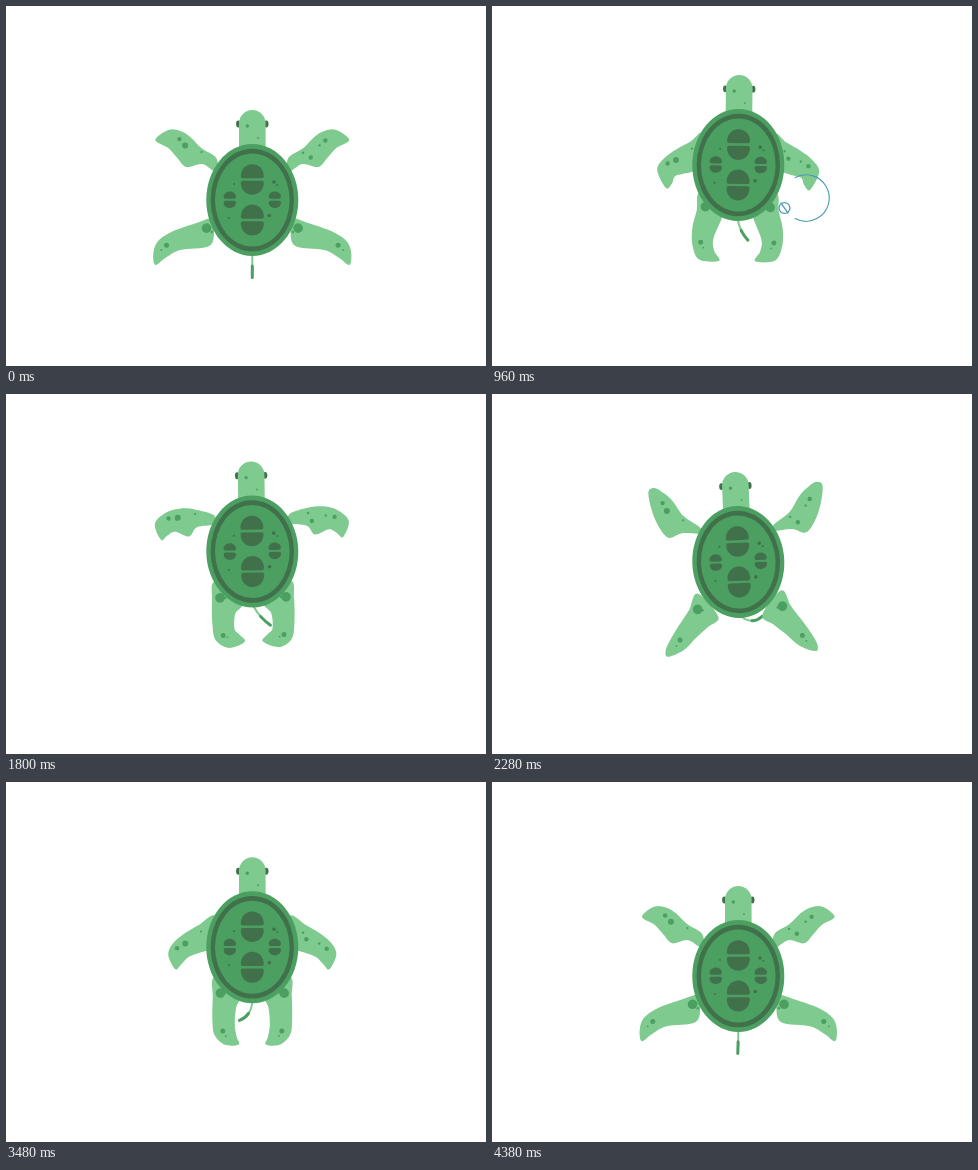
An HTML page with a canvas for the animation above (4410 ms loop, 480 by 360 pixels).

```html
<!DOCTYPE html>
<html lang="en">
<head>
<meta charset="utf-8">
<title>Swimming turtle</title>
<style>
html, body { margin: 0; width: 100%; height: 100%; overflow: hidden; background: #fff; }
canvas { display: block; width: 480px; height: 360px; }
</style>
</head>
<body>
<canvas id="stage" width="480" height="360"></canvas>
<script>
const ctx = document.getElementById('stage').getContext('2d');
const LOOP = 4410, STEP = 30, CENTER_X = 246.3;
const LIGHT = '#7fcb8f', MID = '#4b9f60', DARK = '#41714b', BUBBLE = '#4a9bb5';

// Limb outlines for the right side, relative to the shell centre (x, y pairs).
const front = {
  raised: [36,-42, 51,-52, 62,-63, 72,-69, 84,-70, 97,-60, 84,-52, 75,-42, 66,-33, 50,-36, 36,-28],
  sweep: [37,-36, 56,-37, 74,-37, 90,-33, 101,-25, 104,-14, 92,-12, 80,-10, 66,-6, 52,-13, 37,-14],
  folded: [36,-31, 48,-23, 62,-15, 74,-6, 81,6, 72,24, 66,19, 63,12, 52,9, 42,6, 36,2],
  curled: [38,-37, 57,-43, 72,-44, 86,-40, 97,-29, 91,-13, 85,-17, 77,-21, 63,-16, 55,-25, 38,-28],
  high: [37,-36, 53,-48, 63,-63, 71,-71, 80,-77, 87,-74, 85,-57, 79,-40, 69,-27, 55,-31, 37,-30],
  down: [37,-31, 54,-22, 69,-13, 80,-3, 84,8, 77,22, 71,17, 64,10, 54,6, 43,3, 36,4]
};
const rear = {
  spread: [38,18, 56,23, 81,32, 95,42, 99,54, 97,65, 87,58, 72,50, 43,46, 38,30],
  hooked: [38,28, 41,46, 45,62, 45,80, 38,95, 18,96, 23,86, 24,74, 16,54, 12,40],
  tucked: [38,30, 41,48, 41,72, 38,88, 25,96, 9,90, 14,83, 19,77, 18,62, 11,50],
  diagonal: [42,30, 51,46, 63,63, 72,77, 76,86, 74,92, 58,86, 45,74, 33,64, 22,54],
  closed: [38,30, 39,50, 38,76, 35,89, 24,98, 10,96, 13,88, 15,76, 14,58, 10,42],
  straight: [37,30, 43,48, 51,66, 53,82, 47,94, 36,101, 33,93, 33,80, 27,66, 18,50]
};

// Tracks: [time, values]
const frontTrack = [
  [0, front.raised], [240, front.sweep], [800, front.down], [960, front.folded],
  [1600, front.folded], [1800, front.curled], [2280, front.high], [2520, front.sweep],
  [3000, front.down], [3870, front.down], [4100, front.curled]
];
const rearTrack = [
  [0, rear.spread], [560, rear.straight], [960, rear.hooked], [1800, rear.tucked],
  [2280, rear.diagonal], [2640, rear.straight], [3000, rear.closed], [3300, rear.closed],
  [3870, rear.straight]
];
const heightTrack = [
  [0, [194]], [540, [164]], [960, [159]], [1500, [156.3]], [1800, [157.5]], [2280, [168]],
  [2680, [158]], [3000, [159]], [3300, [161]], [3780, [179]], [3870, [187]], [4050, [193]]
];
const tiltTrack = [[0, [0]], [960, [0.7]], [1800, [-0.9]], [2280, [-2.2]], [3000, [0]], [3870, [0]]];
const tailTrack = [
  [0, [0, 66, 0, 77.5]], [960, [2, 66, 10.5, 75]], [1800, [6, 66, 17, 74]],
  [2280, [12, 64, 22, 55]], [3000, [-1, 68, -9, 76]], [3870, [-1, 69, -14, 71]]
];

// Looping monotone cubic interpolation.
function sample(track, t) {
  const n = track.length;
  const key = i => {
    const lap = Math.floor(i / n);
    const [time, values] = track[i - lap * n];
    return { time: time + lap * LOOP, values };
  };
  let i = n - 1;
  while (track[i][0] > t) i--;
  const [k0, k1, k2, k3] = [key(i - 1), key(i), key(i + 1), key(i + 2)];
  const span = k2.time - k1.time, u = (t - k1.time) / span;
  const slope = (a, b, j) => (b.values[j] - a.values[j]) / (b.time - a.time);
  const tangent = (p, q) => p * q <= 0 ? 0 : 2 * p * q / (p + q);
  return k1.values.map((v, j) => {
    const s1 = slope(k1, k2, j);
    const m1 = tangent(slope(k0, k1, j), s1) * span;
    const m2 = tangent(s1, slope(k2, k3, j)) * span;
    const d = k2.values[j] - v;
    return v + u * (m1 + u * (3 * d - 2 * m1 - m2 + u * (m1 + m2 - 2 * d)));
  });
}

function ellipse(x, y, rx, ry, color) {
  ctx.fillStyle = color;
  ctx.beginPath();
  ctx.ellipse(x, y, rx, ry, 0, 0, 2 * Math.PI);
  ctx.fill();
}

const dot = (x, y, r, color) => ellipse(x, y, r, r, color);

function blob(flat, color) {
  const n = flat.length / 2;
  const x = i => flat[2 * ((i + n) % n)], y = i => flat[2 * ((i + n) % n) + 1];
  ctx.beginPath();
  ctx.moveTo(x(0), y(0));
  for (let i = 0; i < n; i++) {
    ctx.bezierCurveTo(
      x(i) + (x(i + 1) - x(i - 1)) / 6, y(i) + (y(i + 1) - y(i - 1)) / 6,
      x(i + 1) - (x(i + 2) - x(i)) / 6, y(i + 1) - (y(i + 2) - y(i)) / 6,
      x(i + 1), y(i + 1));
  }
  ctx.fillStyle = color;
  ctx.fill();
}

// A spot sits at a weighted mix of outline points: [radius, point, weight, ...]
function spot(flat, [r, ...mix]) {
  let x = 0, y = 0;
  for (let i = 0; i < mix.length; i += 2) {
    x += flat[2 * mix[i]] * mix[i + 1];
    y += flat[2 * mix[i] + 1] * mix[i + 1];
  }
  dot(x, y, r, MID);
}

const rearSpots = [[4.8, 0, .35, 1, .35, 8, .3], [2.5, 3, .6, 7, .4], [0.9, 3, .5, 6, .5], [1.2, 0, .5, 8, .5]];
const leftSpots = [[2.2, 3, .7, 7, .3], [3, 2, .6, 7, .4], [1.1, 1, .75, 9, .25]];
const rightSpots = [[2.2, 1, .5, 8, .5], [2.2, 3, .65, 7, .35], [1.2, 2, .6, 7, .4], [1.2, 1, .7, 9, .3]];

function limbs(frontShape, rearShape) {
  for (const side of [-1, 1]) {
    ctx.save();
    ctx.scale(side, 1);
    blob(rearShape, LIGHT);
    rearSpots.forEach(s => spot(rearShape, s));
    blob(frontShape, LIGHT);
    (side < 0 ? leftSpots : rightSpots).forEach(s => spot(frontShape, s));
    ctx.restore();
  }
}

function tail([cx, cy, ex, ey]) {
  const x1 = cx / 2, y1 = (54 + cy) / 2;
  const mx = (x1 + (cx + ex) / 2) / 2, my = (y1 + (cy + ey) / 2) / 2;
  const part = (width, color, ...p) => {
    ctx.lineWidth = width;
    ctx.strokeStyle = color;
    ctx.beginPath();
    ctx.moveTo(p[0], p[1]);
    ctx.quadraticCurveTo(p[2], p[3], p[4], p[5]);
    ctx.stroke();
  };
  ctx.lineCap = 'round';
  part(2, LIGHT, 0, 54, x1, y1, mx, my);
  part(3, MID, mx, my, (cx + ex) / 2, (cy + ey) / 2, ex, ey);
}

function head() {
  for (const x of [-14, 14]) ellipse(x, -76, 2.2, 3.4, DARK);
  ctx.fillStyle = LIGHT;
  ctx.beginPath();
  ctx.roundRect(-13.3, -90, 26.6, 50, [13.3, 13.3, 0, 0]);
  ctx.fill();
  dot(-5, -74, 1.7, MID);
  dot(5.7, -62, 0.9, MID);
}

// Two facing domes separated by a narrow gap.
function scute(x, y, w, h, gap) {
  ctx.fillStyle = DARK;
  for (const flip of [-1, 1]) {
    ctx.save();
    ctx.translate(x, y);
    ctx.scale(1, flip);
    ctx.beginPath();
    ctx.moveTo(-w + 2, gap);
    ctx.lineTo(w - 2, gap);
    ctx.quadraticCurveTo(w, gap, w, gap + 2);
    ctx.bezierCurveTo(w, gap + h * .65, w * .55, gap + h, 0, gap + h);
    ctx.bezierCurveTo(-w * .55, gap + h, -w, gap + h * .65, -w, gap + 2);
    ctx.quadraticCurveTo(-w, gap, -w + 2, gap);
    ctx.fill();
    ctx.restore();
  }
}

function shell() {
  ellipse(0, 0, 46, 56, MID);
  ellipse(0, 0, 41.7, 51.3, DARK);
  ellipse(0, 0, 37.3, 46.5, MID);
  scute(0, -20.5, 11.5, 14, 1.3);
  scute(0, 20, 11.5, 14.3, 1.2);
  for (const x of [-22.5, 22.5]) scute(x, -0.3, 6.2, 7.3, 1);
  for (const [x, y, r] of [[-18.3, -16, 1], [-23.5, 18, 1], [21.7, -18, 1.8], [25, -15, 1], [17, 15.5, 1.8]])
    dot(x, y, r, DARK);
}

function bubble(t, start, x, y, slash) {
  const p = (t - start) / 480;
  if (p <= 0 || p >= 1) return;
  const r = 34 * (1 - (1 - p) ** 2);
  const open = Math.PI * (1 - Math.max(0, (p - .15) / .85));
  ctx.strokeStyle = BUBBLE;
  ctx.lineCap = 'butt';
  ctx.lineWidth = 1.3 - .4 * p;
  ctx.beginPath();
  ctx.arc(x, y, r, -open, open);
  if (slash && p < .2) {
    ctx.moveTo(x - r * .7, y - r);
    ctx.lineTo(x + r * .7, y + r);
  }
  ctx.stroke();
}

function draw(t) {
  ctx.fillStyle = '#fff';
  ctx.fillRect(0, 0, 480, 360);
  ctx.save();
  ctx.translate(CENTER_X, sample(heightTrack, t)[0]);
  ctx.rotate(sample(tiltTrack, t)[0] * Math.PI / 180);
  tail(sample(tailTrack, t));
  limbs(sample(frontTrack, t), sample(rearTrack, t));
  head();
  shell();
  ctx.restore();
  bubble(t, 750, 314, 192);
  bubble(t, 920, 292.5, 202, true);
  bubble(t, 2930, 169.3, 170);
}

const begin = performance.now();
function tick() {
  const t = (performance.now() - begin) % LOOP;
  draw(Math.floor(t / STEP) * STEP);
  requestAnimationFrame(tick);
}
tick();
</script>
</body>
</html>
```
